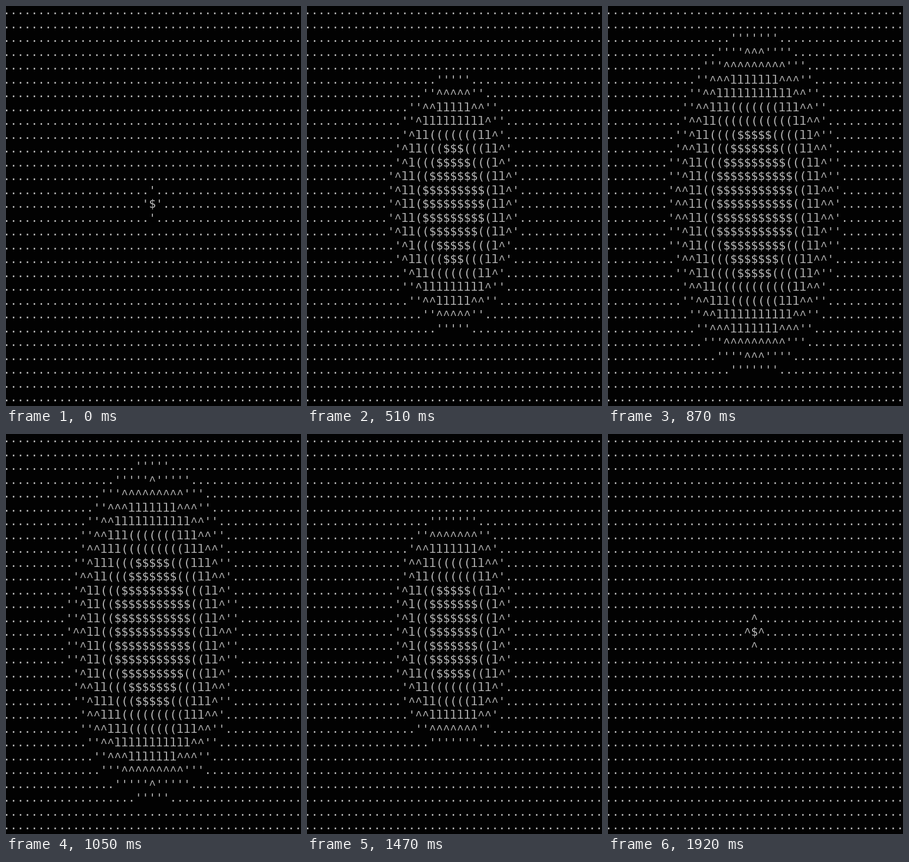
Recreate the animation shown at these times as an HTML page with a canvas. Size 500 by 680 pixels, loop 1950 ms.

```html
<!DOCTYPE html>
<html lang="en">
<head>
<meta charset="utf-8">
<title>Pulsing text sphere</title>
<style>
html, body { margin: 0; width: 100%; height: 100%; overflow: hidden; background: #020202; }
canvas { display: block; }
</style>
</head>
<body>
<canvas id="stage" width="500" height="680"></canvas>
<script>
const ctx = document.getElementById('stage').getContext('2d');
const LOOP = 1950, STEP = 30;
const COLS = 43, ROWS = 29, CELL_W = 11.76, CELL_H = 23.5;

// Characters from the core outwards, each with the face that suits it
const SHADES = [
  ['$', 'DejaVu Sans Mono'], ['(', 'DejaVu Sans Mono'], ['l', 'Noto Sans Mono'],
  ['^', 'Liberation Mono'], ["'", 'DejaVu Sans Mono'], ['.', 'DejaVu Sans Mono']
];

// Squared radius in cells at chosen steps, linear in between
const KEYS = [[0, 1.12], [9, 47.5], [22, 124.2], [28, 154.6],
              [30.8, 168.5], [40, 122.2], [48, 78.5], [63, 1.5]];

function radiusSquared(step) {
  const i = Math.max(1, KEYS.findIndex(key => key[0] >= step));
  const [s0, r0] = KEYS[i - 1], [s1, r1] = KEYS[i];
  return r0 + (r1 - r0) * (step - s0) / (s1 - s0);
}

function draw(step) {
  const ring = radiusSquared(step) / 5;
  ctx.fillStyle = '#020202';
  ctx.fillRect(0, 0, 500, 680);
  ctx.fillStyle = '#b8b8b8';
  ctx.textAlign = 'center';
  for (let row = 0; row < ROWS; row++) {
    for (let col = 0; col < COLS; col++) {
      const dist = (col - 21) ** 2 + (row - 14) ** 2;
      const [char, face] = SHADES[Math.min(5, Math.floor(dist / ring))];
      ctx.font = `19.6px "${face}", monospace`;
      ctx.fillText(char, 1.2 + col * CELL_W, 14 + row * CELL_H);
    }
  }
}

let start, shown = -1;
function tick() {
  const now = performance.now();
  start ??= now;
  const step = Math.max(0, Math.floor((now - start) % LOOP / STEP) - 1);
  if (step !== shown) draw(shown = step);
  requestAnimationFrame(tick);
}
tick();
</script>
</body>
</html>
```
